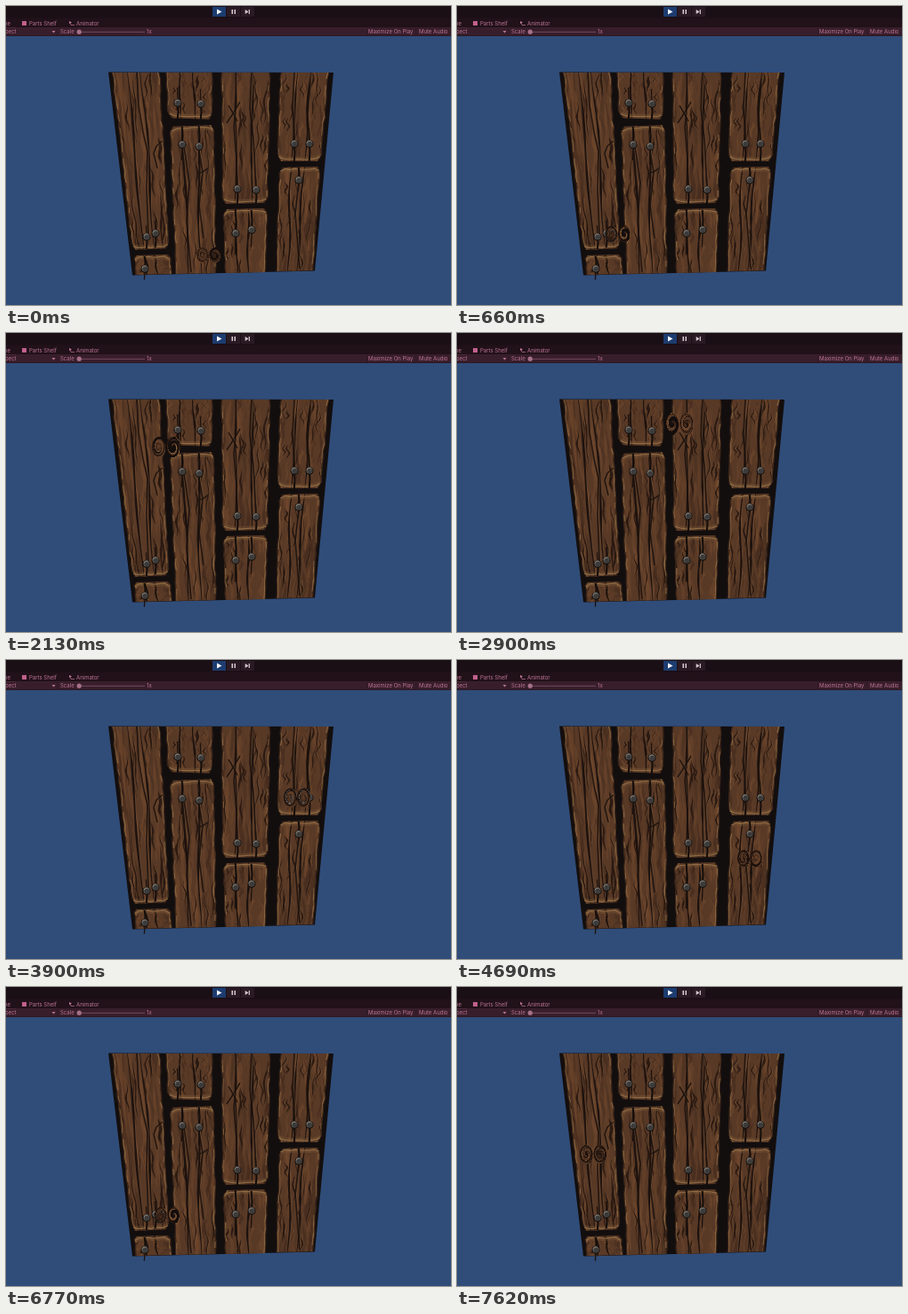
These frames come from a looping animation (500x337 px, 7.7 s). An HTML page with a canvas:

```html
<!DOCTYPE html>
<html lang="en">
<head>
<meta charset="utf-8">
<title>Wood shader preview</title>
<style>
html, body { margin: 0; width: 100%; height: 100%; overflow: hidden; background: #304d79; }
canvas { position: absolute; left: 0; top: 0; }
span { position: absolute; font: 6px/8px Inter, "Open Sans", sans-serif; color: #bd7595; white-space: pre; }
</style>
</head>
<body>
<canvas id="view" width="500" height="337"></canvas>
<span style="left:-2px;top:16px">ne</span>
<span style="left:26px;top:16px">Parts Shelf</span>
<span style="left:79px;top:16px">Animator</span>
<span style="left:-1px;top:25px">pect</span>
<span style="left:61px;top:25px">Scale</span>
<span style="left:158px;top:25px">1x</span>
<span style="left:407px;top:25px">Maximize On Play</span>
<span style="left:464px;top:25px">Mute Audio</span>
<script>
const W = 500, H = 337, LOOP = 7700, STEP = 77;
const view = document.getElementById('view').getContext('2d');
const baseCanvas = document.createElement('canvas');
baseCanvas.width = W;
baseCanvas.height = H;
const g = baseCanvas.getContext('2d', { willReadFrequently: true });

let seed = 41;
function rnd(a = 0, b = 1) {
  seed = (seed * 1664525 + 1013904223) % 4294967296;
  return a + (b - a) * seed / 4294967296;
}

function rect(x, y, w, h, color) {
  g.fillStyle = color;
  g.fillRect(x, y, w, h);
}

function poly(points, color) {
  g.beginPath();
  points.forEach(p => g.lineTo(p[0], p[1]));
  g.closePath();
  g.fillStyle = color;
  g.fill();
}

function line(points, color, width) {
  g.beginPath();
  points.forEach(p => g.lineTo(p[0], p[1]));
  g.strokeStyle = color;
  g.lineWidth = width;
  g.stroke();
}

function disc(x, y, r, color) {
  g.beginPath();
  g.arc(x, y, r, 0, 7);
  g.fillStyle = color;
  g.fill();
}

function drawToolbar() {
  rect(0, 0, W, H, '#304d79');
  rect(0, 0, W, 14, '#1b0f16');
  rect(0, 13.5, W, 10.5, '#211119');
  rect(0, 24, W, 10, '#381e2b');
  rect(0, 24, 11, 1, '#4a2838');
  rect(0, 33.5, W, 0.5, '#20121b');
  rect(232, 1, 15, 11, '#1d3c70');
  rect(248, 1, 15, 11, '#2a1a23');
  rect(264, 1, 15, 11, '#2a1a23');
  poly([[237, 3.5], [242.5, 6.5], [237, 9.5]], '#f2f4fa');
  rect(253.5, 4, 1.5, 5, '#d8c9d1');
  rect(256.5, 4, 1.5, 5, '#d8c9d1');
  poly([[268.7, 4], [272.5, 6.5], [268.7, 9]], '#d8c9d1');
  rect(272.7, 4, 1.2, 5, '#d8c9d1');
  rect(18, 17, 5, 5, '#c2608c');
  // animator tab glyph
  poly([[71, 17], [74, 18.5], [71, 20]], '#bd7595');
  line([[72, 19], [73, 21.5], [77, 21.5]], '#bd7595', 0.7);
  poly([[51.5, 28], [55.5, 28], [53.5, 30.5]], '#bd7595');
  line([[80, 29.3], [156, 29.3]], '#744b60', 1);
  disc(82.2, 29.2, 2.6, '#a6718a');
  [57.5, 405, 460.5].forEach(x => rect(x, 25, 0.6, 8, '#281620'));
}

// Corners run clockwise from top left; flags mark which ends are rounded.
const planks = [
  { q: [118, 75, 174, 75, 184, 273, 141, 275], foot: 1 },
  { q: [143, 281, 185, 280, 187, 302, 145, 303], head: 1 },
  { q: [179, 75, 233, 75, 233, 128, 181, 126], foot: 1 },
  { q: [183, 136, 235, 134, 237, 301, 190, 302], head: 1 },
  { q: [241, 75, 298, 75, 295, 222, 242, 223], foot: 1 },
  { q: [243, 229, 295, 228, 293, 300, 245, 301], head: 1 },
  { q: [307, 75, 364, 75, 355, 175, 304, 175], foot: 1 },
  { q: [306, 182, 354, 181, 346, 298, 303, 299], head: 1 }
];

function at(q, u, v) {
  const mix = i => (q[i] * (1 - u) + q[i + 2] * u) * (1 - v) +
    (q[(i + 6) % 8] * (1 - u) + q[i + 4] * u) * v;
  return [mix(0), mix(1)];
}

// A wavering strand that thins out at both ends.
function strand(q, u, v0, v1, width, color, light) {
  const n = 14, phase = rnd(0, 6), sway = rnd(0.008, 0.035), lean = rnd(-0.06, 0.06);
  const left = [], right = [], rim = [];
  for (let i = 0; i <= n; i++) {
    const k = i / n, v = v0 + (v1 - v0) * k;
    const [x, y] = at(q, u + lean * (k - 0.5) + sway * Math.sin(phase + k * 9), v);
    const half = width * Math.sin(Math.PI * k) * rnd(0.3, 0.65) + 0.1;
    left.push([x - half, y]);
    right.unshift([x + half, y]);
    rim.push([x + half + 0.6, y]);
  }
  poly([...left, ...right], color);
  if (light) line(rim.slice(2, -2), light, 0.65);
}

function drawPlank({ q, head, foot }) {
  const height = q[7] - q[1];
  const steps = Math.max(6, Math.round(height / 7));
  const leftEdge = [], rightEdge = [];
  for (let i = 0; i <= steps; i++) {
    const v = i / steps;
    const end = (head && i === 0) || (foot && i === steps) ? 0.07 : 0;
    leftEdge.push(at(q, 0.015 + end + rnd(0, 0.03), v));
    rightEdge.push(at(q, 0.985 - end - rnd(0, 0.03), v));
  }
  const outline = [...leftEdge, ...rightEdge.slice().reverse()];
  poly(outline, '#58391f'.replace('1f', '26'));
  g.save();
  g.beginPath();
  outline.forEach(p => g.lineTo(p[0], p[1]));
  g.clip();
  const tones = ['#674229b0', '#4b3020b0', '#70492ea0', '#442a1db0', '#5f3d28b0'];
  for (let i = 0; i < 22 + height / 4; i++) {
    const v = rnd(-0.15, 0.9);
    strand(q, rnd(), v, v + rnd(0.15, 0.5), rnd(1.5, 5), tones[i % 5]);
  }
  for (let i = 0; i < 6 + height / 18; i++) {
    const v = rnd(-0.1, 0.85);
    strand(q, rnd(0.04, 0.96), v, v + rnd(0.1, 0.35), rnd(0.8, 2.4), '#25160fe0', i % 2 ? '#936b4670' : '');
  }
  for (const u of [0.32, 0.6]) strand(q, u + rnd(-0.04, 0.04), -0.1, 1.1, 2.3, '#1d120e', '#8a63425c');
  g.restore();
  // worn edges
  const tan = '#977248';
  [leftEdge, rightEdge].forEach((edge, side) => {
    line(edge, '#3a2519', 1.4);
    for (let i = 0; i < edge.length - 1; i++) {
      if (rnd() < 0.62) {
        const dx = side ? -1 : 1;
        line(edge.slice(i, i + 2).map(p => [p[0] + dx, p[1]]), tan + 'c8', rnd(0.6, 1.3));
      }
    }
  });
  const rim = (v, inset) => {
    const pts = [];
    for (let i = 0; i <= 8; i++) {
      const u = 0.05 + i * 0.1125;
      const [x, y] = at(q, u, v);
      const corner = i === 0 || i === 8 ? 4 : 1.5;
      pts.push([x, y + inset * (corner + rnd(0, 1.4))]);
    }
    line(pts, tan + 'e0', 1.3);
    line(pts.map(([x, y]) => [x, y + inset * 1.8]), '#7b573866', 2.2);
  };
  if (head) rim(0, 1);
  if (foot) rim(1, -1);
}

const nails = [
  [193, 109, 19], [219, 110, 18], [198, 156, -20], [217, 158, -23],
  [260, 206, 18], [281, 207, 16], [258, 256, -27], [276, 252, -22],
  [324, 155, 22], [341, 155, 20], [329, 196, -14],
  [158, 260, 14], [168, 256, 16], [156, 296, -14]
];

function drawNail([x, y, split]) {
  line([[x, y], [x + 0.5, y + split * 0.5], [x - 0.3, y + split]], '#130d0b', 2);
  line([[x + 0.2, y], [x - 0.6, y - split * 0.9]], '#1a110d', 1.3);
  disc(x, y + 0.4, 4.5, '#15100e');
  disc(x, y, 3.5, '#5b5854');
  disc(x + 0.3, y + 0.5, 2.7, '#3c3b3a');
  g.beginPath();
  g.arc(x, y, 3.1, 3.3, 5.2);
  g.strokeStyle = '#94908a';
  g.lineWidth = 0.8;
  g.stroke();
}

function drawWood() {
  poly([[115, 74.5], [368, 75], [347, 298.5], [142, 303.5]], '#130e0e');
  planks.forEach(drawPlank);
  const cuts = [
    [[147, 75], [149, 112], [154, 142], [159, 164], [158, 205], [160, 258]],
    [[176, 152], [169, 158], [166, 166], [170, 183]],
    [[258, 75], [259, 108], [256, 136], [259, 172], [260, 205]],
    [[276, 75], [274, 115], [278, 150], [281, 206]],
    [[248, 132], [256, 120], [263, 108]],
    [[250, 112], [256, 122], [260, 130]],
    [[324, 75], [322, 112], [324, 154]],
    [[342, 82], [339, 122], [341, 154]],
    [[200, 158], [206, 199], [203, 244], [208, 300]],
    [[216, 158], [221, 187], [217, 225], [222, 262]],
    [[214, 189], [221, 187], [227, 183]],
    [[329, 199], [325, 234], [330, 296]]
  ];
  cuts.forEach(c => {
    line(c.map(([x, y]) => [x + 1.5, y]), '#82603f70', 0.7);
    line(c, '#1b110ddd', 1.6);
  });
  nails.forEach(drawNail);
}

// Texture space to screen, in perspective.
function project(u, v) {
  const w = 1 + 0.0322 * u + 0.2374 * v;
  return [(264.85 * u + 60.7 * v + 115) / w, (3.42 * u + 300.9 * v + 74) / w];
}

drawToolbar();
drawWood();
const base = g.getImageData(0, 0, W, H);

function swirl(out, x, y, rx, ry) {
  for (let py = Math.floor(y - ry); py <= y + ry; py++) {
    for (let px = Math.floor(x - rx); px <= x + rx; px++) {
      const dx = (px - x) / rx, dy = (py - y) / ry, r = Math.hypot(dx, dy);
      if (r >= 1) continue;
      const a = Math.atan2(dy, dx) + 9 * (1 - r);
      const sx = Math.round(x + Math.cos(a) * r * rx);
      const sy = Math.round(y + Math.sin(a) * r * ry);
      const from = (sy * W + sx) * 4, to = (py * W + px) * 4;
      for (let c = 0; c < 3; c++) out.data[to + c] = base.data[from + c];
    }
  }
}

function ring(x, y, rx, ry, color, width) {
  view.beginPath();
  view.ellipse(x, y, rx, ry, 0, 0, 7);
  view.strokeStyle = color;
  view.lineWidth = width;
  view.stroke();
}

function draw(time) {
  const step = Math.min(99, Math.floor(time / STEP + 0.36));
  const angle = (12.5 + 58.4 * step * STEP / 1000) * Math.PI / 180;
  const u = 0.5 - 0.4 * Math.sin(angle), v = 0.5 + 0.4 * Math.cos(angle);
  const eyes = [-0.033, 0.033].map(du => {
    const [x, y] = project(u + du, v);
    return [x, y, project(u + du + 0.033, v)[0] - x, project(u + du, v + 0.048)[1] - y];
  });
  const out = new ImageData(new Uint8ClampedArray(base.data), W, H);
  eyes.forEach(e => swirl(out, ...e));
  view.putImageData(out, 0, 0);
  const dark = 0.5 + 0.4 * Math.abs(Math.sin(angle));
  eyes.forEach(([x, y, rx, ry], i) => {
    ring(x, y, rx * 0.82, ry * 0.82, `rgba(24,14,10,${dark})`, 1.6);
    ring(x, y, rx * 0.3, ry * 0.3, `rgba(28,17,11,${0.75 - dark * 0.5})`, 1.4);
  });
}

const start = performance.now();
function tick() {
  draw((performance.now() - start) % LOOP);
  requestAnimationFrame(tick);
}
tick();
</script>
</body>
</html>
```
